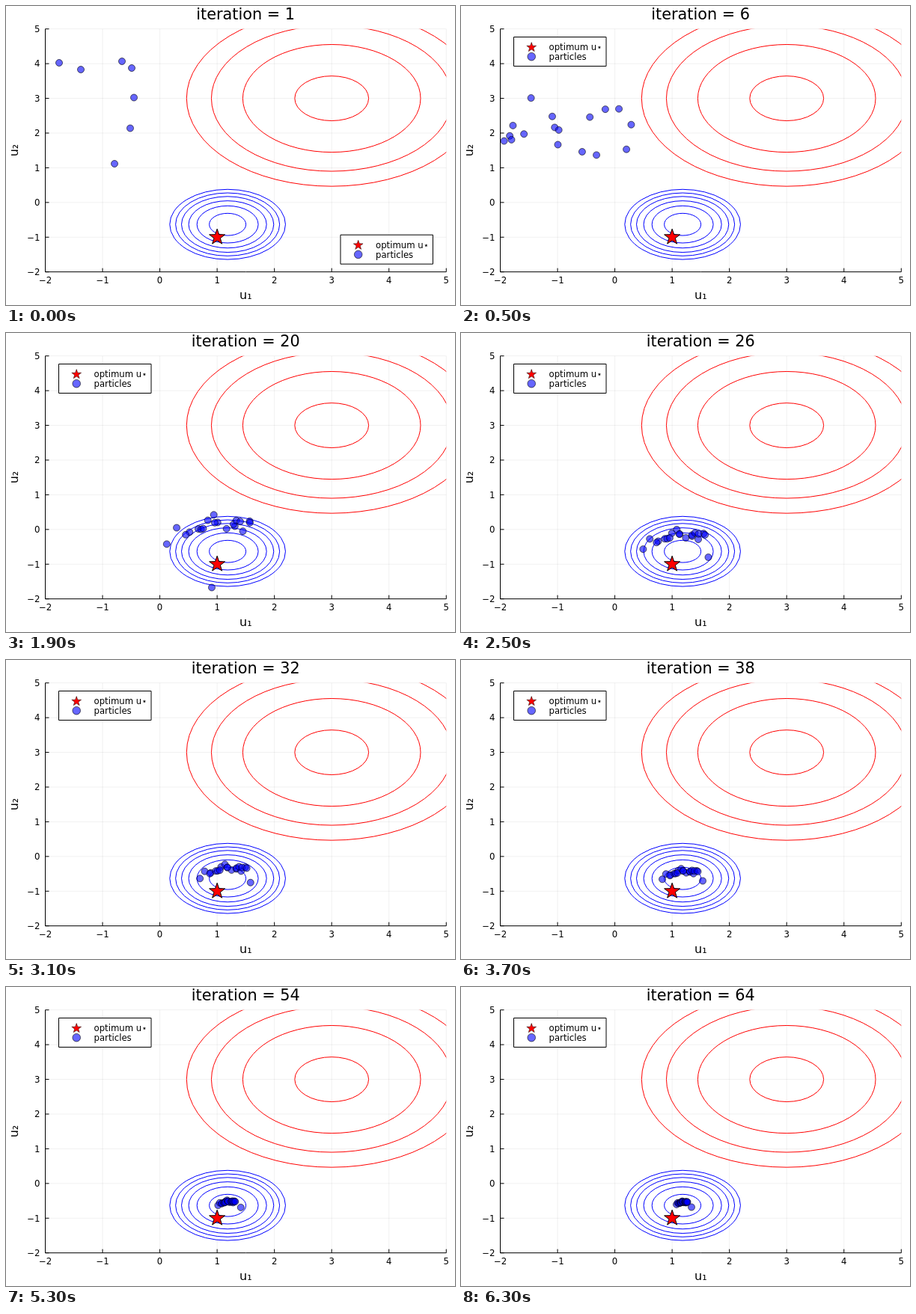
Recreate the animation shown at these times as an HTML page with a canvas. Size 600 px wide and 400 px high, loop 6.4 s.

```html
<!DOCTYPE html>
<html>
<head>
<meta charset="utf-8">
<style>
html, body { margin: 0; width: 100%; height: 100%; overflow: hidden; background: #fff; }
canvas { display: block; }
</style>
</head>
<body>
<canvas id="stage" width="600" height="400"></canvas>
<script>
const ctx = document.getElementById('stage').getContext('2d');
const STEP_MS = 100, STEPS = 64, COUNT = 19, ENTRY = 10;
const LEFT = 52.5, RIGHT = 588.3, TOP = 30.7, BOTTOM = 355.7;
const UX = (RIGHT - LEFT) / 7, UY = (BOTTOM - TOP) / 7;
const px = u => LEFT + (u + 2) * UX;
const py = u => BOTTOM - (u + 2) * UY;
const mix = (a, b, k) => a + (b - a) * k;

let seed = 7;
function noise() {
  seed = seed * 16807 % 2147483647;
  return (seed / 2147483647 - .5) * 3;
}

// Every third particle is visible from the start; the rest enter from the left.
const visible = [[71, 76], [100, 85], [145, 211], [155, 74], [166, 163.5], [168, 83], [171, 122.5]];
const swarm = Array.from({ length: COUNT }, (_, i) => ({
  place: 2 * i / (COUNT - 1) - 1,
  dx: noise(),
  dy: noise(),
  start: i % 3 ? null : visible[i / 3]
}));
const straggler = [[0, -90, 200], [10, 117, 268], [19, 275, 340.5], [25, 330.5, 300], [37, 323, 295.5], [63, 308, 294.5]];

// The swarm is an arch that drifts to its goal while it shrinks.
function settle({ place, dx, dy }, step) {
  const t = step - ENTRY;
  const spread = 75 * Math.exp(-t / 22);
  const jitter = spread * (.12 + .26 * Math.exp(-t / 6));
  return [
    296 - 81 * Math.exp(-t / 6) + spread * place + jitter * dx,
    288 - 83 * Math.exp(-t / 10) + spread * (.22 * place * place - .12 * place) + jitter * dy
  ];
}

function position(particle, step) {
  const [x, y] = settle(particle, Math.max(step, ENTRY));
  if (step >= ENTRY) return [x, y];
  const [x0, y0] = particle.start || [x - 260, y - 90];
  return [mix(x0, x, step / ENTRY), mix(y0, y, step / ENTRY)];
}

function along(path, step) {
  const n = Math.max(1, path.findIndex(p => p[0] >= step));
  const [s0, x0, y0] = path[n - 1], [s1, x1, y1] = path[n];
  const k = (step - s0) / (s1 - s0);
  return [mix(x0, x1, k), mix(y0, y1, k)];
}

function line(x0, y0, x1, y1) {
  ctx.beginPath();
  ctx.moveTo(x0, y0);
  ctx.lineTo(x1, y1);
  ctx.stroke();
}

function text(str, x, y, size, align = 'center') {
  ctx.font = `${size}px "DejaVu Sans", sans-serif`;
  ctx.textAlign = align;
  ctx.fillStyle = '#000';
  ctx.fillText(str, x, y);
}

function paint(fill, stroke, width) {
  ctx.fillStyle = fill;
  ctx.fill();
  ctx.strokeStyle = stroke;
  ctx.lineWidth = width;
  ctx.stroke();
}

function star(x, y, r, width) {
  ctx.beginPath();
  for (let i = 0; i < 10; i++) {
    const a = i * Math.PI / 5, d = i % 2 ? r * .4 : r;
    ctx.lineTo(x + d * Math.sin(a), y - d * Math.cos(a));
  }
  ctx.closePath();
  paint('#f00', '#000', width);
}

function dot(x, y, r) {
  ctx.beginPath();
  ctx.arc(x, y, r, 0, 7);
  paint('rgba(0,0,255,.6)', 'rgba(0,0,0,.6)', 1);
}

function contours(u, v, color, radii) {
  ctx.strokeStyle = color;
  ctx.lineWidth = 1;
  for (const r of radii) {
    ctx.beginPath();
    ctx.ellipse(px(u), py(v), r * UX, r * UY, 0, 0, 2 * Math.PI);
    ctx.stroke();
  }
}

function axes() {
  ctx.lineWidth = 1;
  for (let u = -2; u <= 5; u++) {
    const x = px(u), y = py(u), label = String(u).replace('-', '\u2212');
    ctx.strokeStyle = 'rgba(0,0,0,.06)';
    line(x, TOP, x, BOTTOM);
    line(LEFT, y, RIGHT, y);
    ctx.strokeStyle = '#000';
    line(x, BOTTOM, x, BOTTOM - 5);
    line(LEFT, y, LEFT + 5, y);
    text(label, x, 371, 11.7);
    text(label, 45.5, y + 4.3, 11.7, 'right');
  }
  line(LEFT, TOP, LEFT, BOTTOM);
  line(LEFT, BOTTOM, RIGHT, BOTTOM);
  text('u₁', 320.4, 392, 16);
  ctx.save();
  ctx.translate(16, 193);
  ctx.rotate(-Math.PI / 2);
  text('u₂', 0, 0, 16);
  ctx.restore();
}

function legend(x, y) {
  ctx.beginPath();
  ctx.rect(x, y, 123.5, 39);
  paint('#fff', '#000', 1);
  star(x + 23.7, y + 13.8, 6.7, .5);
  dot(x + 23.7, y + 26.2, 5.3);
  text('optimum u⋆', x + 47, y + 17.5, 11.7, 'left');
  text('particles', x + 47, y + 30.5, 11.7, 'left');
}

function draw(step) {
  ctx.fillStyle = '#fff';
  ctx.fillRect(0, 0, 600, 400);
  axes();
  text('iteration = ' + (step + 1), 320.2, 18, 20.8);
  ctx.save();
  ctx.beginPath();
  ctx.rect(LEFT, TOP, RIGHT - LEFT, BOTTOM - TOP);
  ctx.clip();
  contours(3, 3, '#f00', [.645, 1.552, 2.1, 2.533]);
  contours(1.183, -.632, '#00f', [.32, .535, .68, .805, .908, 1.01]);
  star(px(1), py(-1), 11, 1);
  for (const particle of swarm) dot(...position(particle, step), 4.5);
  dot(...along(straggler, step), 4.5);
  ctx.restore();
  if (step < 4) legend(447, 306.2);
  else legend(70.5, 41.5);
}

function tick() {
  draw(Math.floor(performance.now() / STEP_MS) % STEPS);
  requestAnimationFrame(tick);
}
tick();
</script>
</body>
</html>
```
